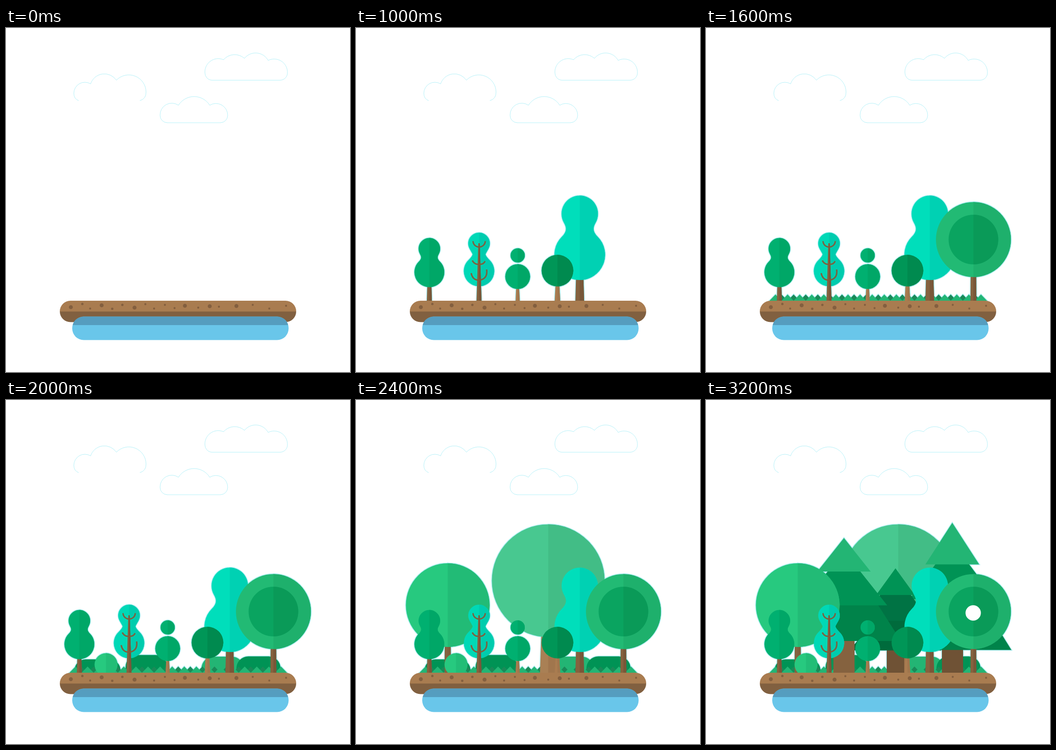
Recreate the animation shown at these times as an HTML page. Size 748 by 748 pixels, loop 4600 ms.

```html
<!DOCTYPE html>
<html lang="en">
<head>
<meta charset="utf-8">
<title>Growing forest</title>
<style>
html, body { margin: 0; width: 100%; height: 100%; overflow: hidden; background: #fff; }
svg { display: block; width: 100vw; height: 100vh; }
</style>
</head>
<body>
<svg viewBox="0 0 748 748">
  <g fill="#fff" stroke="#b4f1f9">
    <path d="M158 158Q147.500 154 147.500 142A24 24 0 0 1 184 121.500A31.500 31.500 0 0 1 240 113.500A37.500 37.500 0 0 1 304.500 139Q305 154 291 158"/>
    <path d="M351 206A16 16 0 0 1 335 190A25.500 25.500 0 0 1 375 168A40 40 0 0 1 443 168A25.500 25.500 0 0 1 482 190A16 16 0 0 1 466 206Z"/>
    <path d="M448 113.500A16 16 0 0 1 432.500 97A29 29 0 0 1 473 69A32 32 0 0 1 518.500 66A31 31 0 0 1 570 70.500A29 29 0 0 1 612 97A16 16 0 0 1 596 113.500Z"/>
  </g>
  <!-- pale halo behind whatever is visible -->
  <use href="#scene" stroke="#aeeef3" stroke-width="3"/>
  <g id="scene"></g>
  <clipPath id="soil"><rect x="117" y="593" width="514" height="46.500" rx="23.250"/></clipPath>
  <clipPath id="pool"><rect x="144" y="627.500" width="470.500" height="51" rx="25"/></clipPath>
  <g clip-path="url(#soil)">
    <path fill="#a97c50" d="M117 593h515v24h-515z"/>
    <path fill="#816040" d="M117 616.500h515v24h-515z"/>
  </g>
  <g id="stones" fill="#835f3f"></g>
  <g clip-path="url(#pool)">
    <path fill="#69c6ea" d="M144 627h471v52h-471z"/>
    <path fill="#559dbf" d="M144 627h471v19h-471z"/>
  </g>
</svg>
<script>
const STEP = 200, LOOP = 4600, GROUND = 594;
const scene = document.getElementById('scene');
const fill = (d, color) => `<path fill="${color}" d="${d}"/>`;
const circle = (x, y, r, color) => `<circle cx="${x}" cy="${y}" r="${r}" fill="${color}"/>`;

// A symmetric shape, its right half shaded; side(s) gives one half, s = 1 right, -1 left
const shaded = (side, light, dark) => fill(side(-1) + side(1), light) + fill(side(1), dark);

const ball = (x, y, r, light, dark) =>
  shaded(s => `M${x} ${y - r}A${r} ${r} 0 0 ${s > 0 ? 1 : 0} ${x} ${y + r}Z`, light, dark);

const trunk = (x, top, w1, w2, light = '#85623f', dark = '#785739') =>
  shaded(s => `M${x} ${top}h${s * w1}L${x + s * w2} ${GROUND}H${x}Z`, light, dark);

// Two circles joined by a waist of half-width w at height wy
function peanut(x, y1, r1, y2, r2, w, wy, light, dark) {
  const k = Math.SQRT1_2, c = Math.cos(Math.PI / 6);
  const bend1 = y1 + r1 / 2 + (c * r1 - w) * 2 * c;
  const bend2 = y2 - 2 * k * r2 + w;
  return shaded(s => {
    const sweep = s > 0 ? 1 : 0;
    return `M${x} ${y1 - r1}A${r1} ${r1} 0 0 ${sweep} ${x + s * c * r1} ${y1 + r1 / 2}` +
      `Q${x + s * w} ${bend1} ${x + s * w} ${wy}` +
      `Q${x + s * w} ${bend2} ${x + s * k * r2} ${y2 - k * r2}` +
      `A${r2} ${r2} 0 0 ${sweep} ${x} ${y2 + r2}Z`;
  }, light, dark);
}

// Tiers are [top, half-width at top, bottom, half-width at bottom, color]
const pine = (x, tiers) => tiers.map(([top, a, bottom, b, color]) =>
  fill(`M${x - a} ${top}H${x + a}L${x + b} ${bottom}H${x - b}Z`, color)).join('');

const block = (x, y, w, color, r = 0, h = GROUND - y) =>
  `<rect x="${x}" y="${y}" width="${w}" height="${h}" rx="${r}" fill="${color}"/>`;

function grass(x, count, color) {
  let d = `M${x} 593`;
  for (let i = 0; i < count; i++) d += 'l13.140 -13.500l13.140 13.500';
  return fill(d + 'Z', color);
}

const G = ['#00b070', '#00a767'], TEAL = ['#00debb', '#00d1b3'];
const SAND = ['#a97c50', '#a0764d'];

// Back to front: [step at which it appears, markup]
const parts = [
  [9, block(149, 564, 100, '#009355', 24, 48) + block(260, 554.5, 91, '#009355', 26, 55) +
      block(425, 558, 92, '#23b574', 26, 52) + block(501, 557.5, 96, '#009355', 26, 52)],
  [8, grass(151.14, 17, '#1a8a58')],
  [7, grass(138, 18, '#23b574')],
  [12, trunk(418, 505, 15, 18, '#a98055', '#a0764d') + ball(418, 393, 122.5, '#48c890', '#42bd86')],
  [13, block(513, 540, 46, '#6f5235') + pine(535.5, [
    [430, 58, 543.5, 128.5, '#00834a'], [355, 35, 433, 93, '#009355'], [267, 0, 357.5, 58.5, '#23b574']])],
  [15, block(393, 540, 38, '#6f5235') + pine(412, [
    [478, 45, 544.5, 100, '#006b3c'], [422, 32, 480, 74, '#007344'], [366, 0, 424, 42, '#009355']])],
  [14, pine(300, [
    [444, 73, 524, 124, '#00834a'], [371, 34, 446.5, 94, '#009355'], [300, 0, 373, 58, '#23b574']]) +
    block(277, 524, 46, '#85623f') ],
  [11, trunk(199.5, 530, 6.5, 7, '#85623f', '#815f3d') + ball(199.5, 446, 91, '#27c97f', '#22bb76')],
  [10, ball(217.5, 575.5, 25, '#27c97f', '#22bd77')],
  [1, trunk(159.5, 560, 4.5, 5.5) + peanut(159.5, 480, 23.5, 531, 32.5, 18, 499, ...G)],
  [2, peanut(267.5, 468.5, 23.5, 528.5, 33, 14, 492, '#00d8b6', '#00ccae') + trunk(267.5, 468, 1.5, 5.5) +
    `<path fill="none" stroke="#815d3c" stroke-width="3" d="M254.500 463.500A13 12.500 0 0 0 281 463.500
      M253 505.500Q257 514 267.500 514T280.500 507M250.500 533Q253 548 267.500 548.500Q287 546 284 525"/>`],
  [3, trunk(351.5, 560, 3, 4.5, ...SAND) + ball(351.5, 494.5, 15.5, ...G) + ball(351.5, 540.5, 27, ...G)],
  [4, trunk(486.5, 540, 8, 9.5, '#85623f', '#785739') + peanut(486.5, 404, 39.5, 493, 55, 30, 437, ...TEAL)],
  [5, trunk(438, 555, 4, 6, ...SAND) + ball(438, 527.5, 34.5, '#009657', '#008a4f')],
  [6, trunk(581.5, 535, 6, 6.5) + ball(581.5, 460, 81.5, '#22ba74', '#1eb06c') +
      ball(581.5, 460, 54, '#0aa460', '#0a9a58')],
  [16, circle(581, 463, 16.7, '#fff')]
];
scene.innerHTML = parts.map(p => `<g>${p[1]}</g>`).join('');

// Stones are x, y, radius
const stones = [
  141, 607, 4.3, 166, 600, 2.6, 183, 610, 2.2, 208, 603, 4.3, 231, 610.5, 2.6, 253, 602, 2.6,
  279.5, 608, 4.3, 303, 600.5, 2.2, 322, 610, 2.2, 345.5, 602, 2.2, 366.5, 609, 2.2, 389, 604, 4.3,
  418, 608, 2.2, 443, 605, 4.3, 463, 606, 2.2, 501, 604.5, 4.3, 536.5, 602, 2.2, 572.5, 610, 2.2, 609, 604, 2.2];
let dots = '';
for (let i = 0; i < stones.length; i += 3) dots += circle(stones[i], stones[i + 1], stones[i + 2], '#835f3f');
document.getElementById('stones').innerHTML = dots;

let shown = -1;
function draw() {
  const step = Math.floor(performance.now() % LOOP / STEP);
  if (step !== shown) {
    shown = step;
    parts.forEach(([start], i) => scene.children[i].setAttribute('display', step >= start ? 'inline' : 'none'));
  }
  requestAnimationFrame(draw);
}
draw();
</script>
</body>
</html>
```
